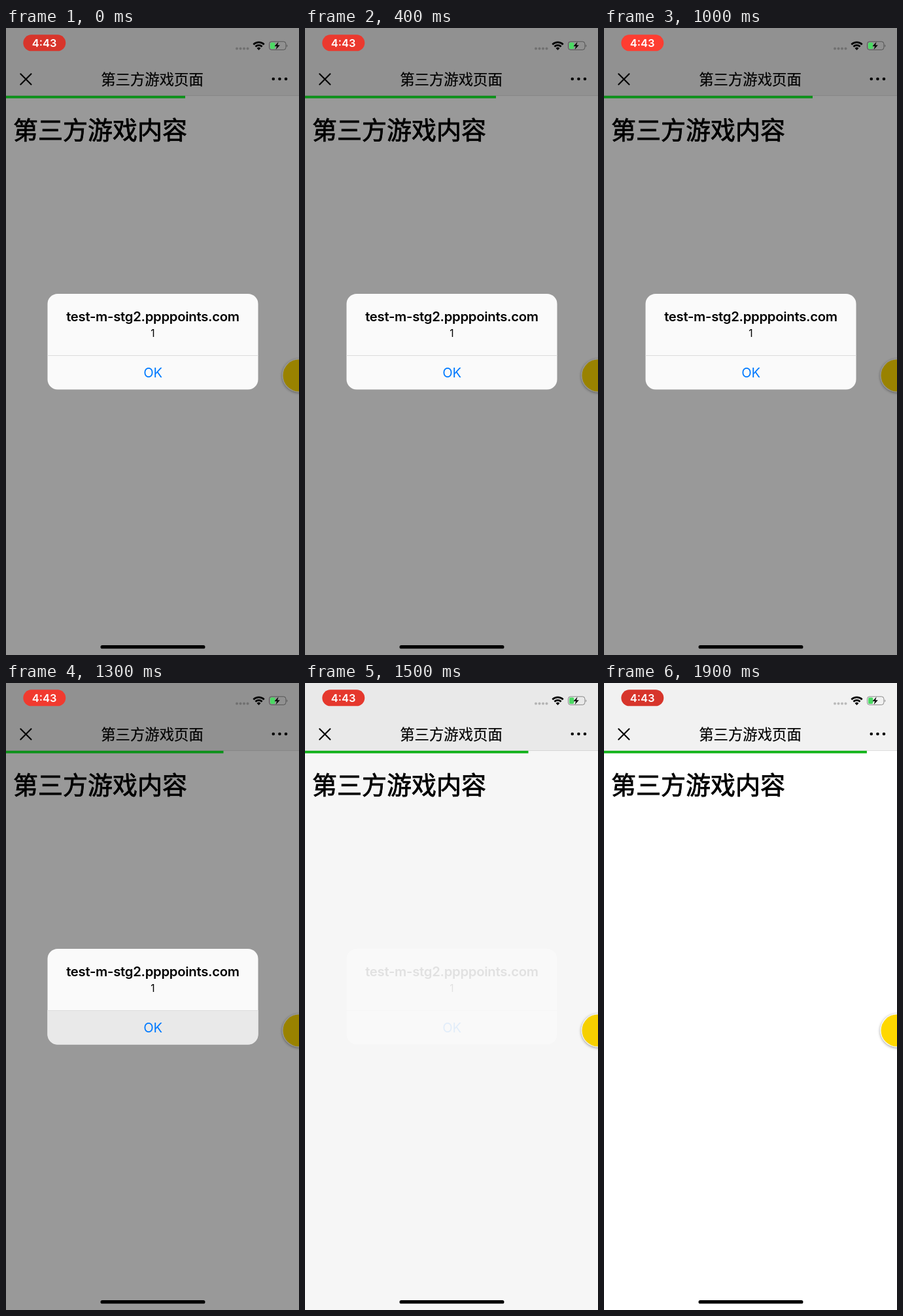
Write an HTML page that moves like this. It is 448x960 px and loops after 2 s.

```html
<!DOCTYPE html>
<html lang="zh">
<head>
<meta charset="utf-8">
<style>
  html, body { margin: 0; width: 100%; height: 100%; overflow: hidden; background: #fff; }
  svg { display: block; width: 448px; height: 960px; }
  text { font-family: Inter, sans-serif; text-anchor: middle; }
  .cjk { font-family: "Noto Sans CJK SC", "Noto Sans CJK", sans-serif; stroke: #000; }
  .line { fill: none; stroke: #000; stroke-linecap: round; }
</style>
</head>
<body>
<svg viewBox="0 0 448 960">
  <defs>
    <filter id="shadow" x="-30%" y="-30%" width="160%" height="160%">
      <feDropShadow dx="0" dy="1" stdDeviation="2" flood-opacity=".45"/>
    </filter>
    <clipPath id="card"><rect x="63.5" y="407" width="322" height="146.5" rx="15.5"/></clipPath>
  </defs>

  <!-- page -->
  <rect width="448" height="960" fill="#fff"/>
  <rect width="448" height="103.5" fill="#f1f1f1"/>
  <rect y="103" width="448" height="1" fill="#dedede"/>
  <g fill="#bbb">
    <circle cx="353" cy="31.5" r="2"/><circle cx="358.5" cy="31.5" r="2"/>
    <circle cx="364" cy="31.5" r="2"/><circle cx="369.5" cy="31.5" r="2"/>
  </g>
  <path class="line" stroke-width="2.1" d="M22.3 70.3l16.2 16.2m0-16.2l-16.2 16.2"/>
  <circle cx="408.8" cy="78" r="2.3"/><circle cx="418.4" cy="78" r="2.3"/><circle cx="428" cy="78" r="2.3"/>
  <text class="cjk" x="223.5" y="86.5" font-size="22.4" stroke-width=".2">第三方游戏页面</text>
  <text class="cjk" x="144" y="169.5" font-size="38" stroke-width=".8">第三方游戏内容</text>
  <circle cx="448" cy="532" r="25.5" fill="#fff" filter="url(#shadow)"/>
  <circle cx="448" cy="532" r="24.5" fill="#ffd800"/>
  <rect id="dim" width="448" height="960"/>

  <!-- status bar and progress -->
  <rect id="bar" y="103.8" height="3.8"/>
  <rect id="pill" x="26.3" y="10.3" width="65" height="25" rx="12.5"/>
  <text x="58.7" y="29" font-size="16.5" font-weight="600" fill="#fff">4:43</text>
  <g fill="none" stroke="#000" stroke-width="2.6">
    <path d="M378.3 25.2a11.7 11.7 0 0 1 16.4 0M381.4 28.5a7.3 7.3 0 0 1 10.2 0"/>
  </g>
  <path d="M383.6 30.9a4.2 4.2 0 0 1 5.8 0l-2.9 3z"/>
  <rect x="402.5" y="20.8" width="25.4" height="12.6" rx="3.5" fill="none" stroke="#000" stroke-opacity=".42"/>
  <path d="M429.2 25.2q2.4 2 0 4z" fill-opacity=".42"/>
  <rect x="404" y="22.3" width="7.4" height="9.6" rx="2" fill="#4cd964"/>
  <path d="M416.6 21.2l-6.2 6.7h3.7l-1.5 5.2 6.2-6.8h-3.7z"/>
  <rect x="144.5" y="945" width="160" height="5.3" rx="2.65"/>

  <!-- alert -->
  <g id="panel" clip-path="url(#card)">
    <rect x="63" y="406" width="323" height="148" fill="#fafafa"/>
    <rect id="pressed" x="63" y="501" width="323" height="53" fill="#e9e9e9"/>
  </g>
  <g id="words">
    <rect x="63.5" y="501" width="322" height="1" fill="#dcdcdc"/>
    <text x="224.5" y="449" font-size="20.3" font-weight="600" letter-spacing="-.28">test-m-stg2.ppppoints.com</text>
    <text x="224.5" y="473" font-size="15.5">1</text>
    <text x="224.5" y="535" font-size="20.3" letter-spacing="-.4" fill="#007aff">OK</text>
  </g>
</svg>
<script>
  const el = id => document.getElementById(id);
  const [dim, bar, pill, panel, pressed, words] =
    ["dim", "bar", "pill", "panel", "pressed", "words"].map(el);
  const mix = (a, b, k) => `rgb(${a.map((v, i) => Math.round(v + (b[i] - v) * k))})`;

  function progress(step) {
    const late = Math.max(0, step - 15);
    return 274 + 4.5 * step + 2.65 * late * late;
  }

  function draw(now) {
    const step = Math.floor(now % 2000 / 100);
    // The alert holds, then fades out over three steps.
    const fade = step < 14 ? 1 : [0.49, 0.09][step - 14] || 0;
    const panelFade = step < 14 ? 1 : step < 16 ? 0.71 : 0;
    const glow = (1 + Math.cos(Math.PI * (step - 9) / 10)) / 2;

    dim.setAttribute("opacity", 0.4 * fade);
    words.setAttribute("opacity", fade);
    panel.setAttribute("opacity", panelFade);
    pressed.setAttribute("opacity", step === 13 ? 1 : 0);
    bar.setAttribute("width", progress(step));
    bar.setAttribute("fill", mix([16, 180, 24], [10, 146, 24], fade));
    pill.setAttribute("fill", mix([215, 53, 43], [255, 61, 49], glow));
    requestAnimationFrame(() => draw(performance.now()));
  }
  draw(0);
</script>
</body>
</html>
```
